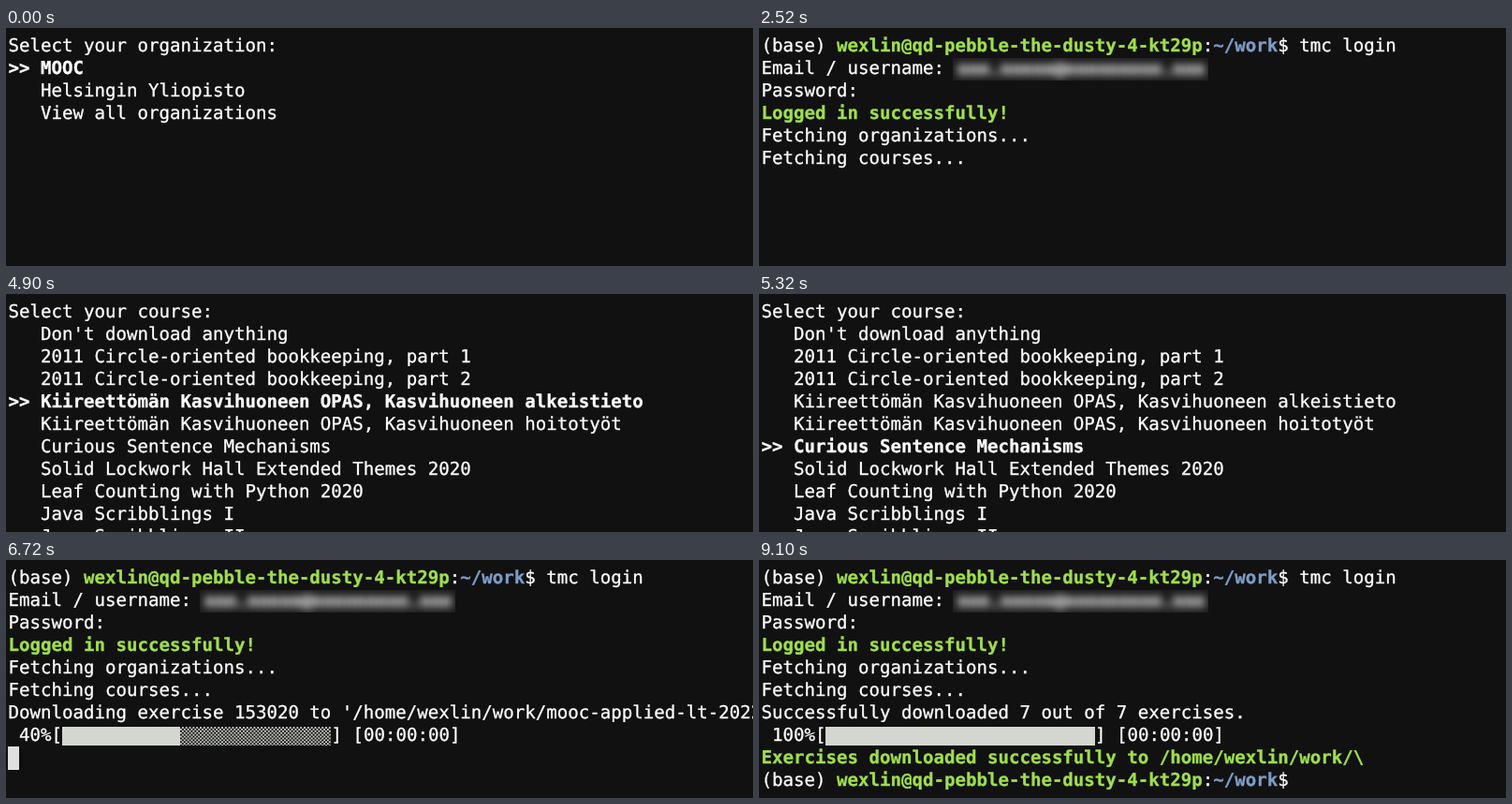
An HTML page for the animation above (9760 ms loop, 798x254 px).

```html
<!DOCTYPE html>
<html lang="en">
<head>
<meta charset="utf-8">
<title>Terminal login</title>
<style>
html, body { margin: 0; width: 100%; height: 100%; overflow: hidden; background: #111; }
body { position: relative; contain: paint; }
pre {
  position: absolute; inset: 0; box-sizing: border-box; margin: 0; padding: 6.6px 0 0 2.5px;
  overflow: hidden; color: #fff;
  font: 19.1px/24px "DejaVu Sans Mono", monospace;
  text-rendering: geometricPrecision; font-variant-ligatures: none;
  -webkit-text-stroke: .3px;
}
b.green { color: #9fdf4d; }
b.blue { color: #7d9dc8; }
.bar i { display: inline-block; height: 20px; vertical-align: -5px; }
.full { background: #d3d7cf; }
.rest { background: repeating-conic-gradient(#c4c8c0 0 25%, #111 0 50%) 0 0 / 3.83px 3.83px; }
.secret {
  position: absolute; left: 207px; top: 32px; width: 273px; height: 24px;
  overflow: hidden; background: #1c1c1c;
}
.secret b { display: block; margin-left: 5px; filter: blur(4px); }
#cursor { position: absolute; width: 11.5px; height: 25px; background: #e0e0e0; }
#smudge { position: absolute; left: 215px; top: 58px; width: 36px; height: 4px; background: #111; }
</style>
</head>
<body>
<pre id="screen"></pre>
<div id="cursor"></div>
<div id="smudge"></div>
<script>
const LOOP = 9760, CELL = 11.5, ROW = 24, BAR = 25;
const $ = id => document.getElementById(id);
const green = s => `<b class="green">${s}</b>`;

const home = "/home/wexlin/work/";
const prompt = `(base) ${green("wexlin@qd-pebble-the-dusty-4-kt29p")}:<b class="blue">~/work</b>$`;
const login = [
  prompt + " tmc login",
  'Email / username: <span class="secret"><b>nnn.nnnnn@nnnnnnnnn.nnn</b></span>',
  "Password:",
  green("Logged in successfully!"),
  "Fetching organizations...",
  "Fetching courses..."
];
const orgs = ["MOOC", "Helsingin Yliopisto", "View all organizations"];
const courses = [
  "Don't download anything",
  "2011 Circle-oriented bookkeeping, part 1",
  "2011 Circle-oriented bookkeeping, part 2",
  "Kiireettömän Kasvihuoneen OPAS, Kasvihuoneen alkeistieto",
  "Kiireettömän Kasvihuoneen OPAS, Kasvihuoneen hoitotyöt",
  "Curious Sentence Mechanisms",
  "Solid Lockwork Hall Extended Themes 2020",
  "Leaf Counting with Python 2020",
  "Java Scribblings I",
  "Java Scribblings II"
];

const menu = (title, items, pick) => ({
  lines: [title, ...items.map((s, i) => i === pick ? `<b>&gt;&gt; ${s}</b>` : "   " + s)]
});
const pickCourse = n => menu("Select your course:", courses, n);

const shell = (extra, cursor) => ({ lines: [...login, ...extra], cursor });

function bar(percent) {
  const n = Math.min(BAR, Math.floor(percent / 100 * BAR) + 1);
  const part = (name, cols) => `<i class="${name}" style="width:${cols * CELL}px"></i>`;
  return `<span class="bar"> ${percent}%[${part("full", n)}${part("rest", BAR - n)}] [00:00:00]</span>`;
}
const download = (message, percent) => shell([message, bar(percent)], [0, 8]);
const exercise = id => `Downloading exercise ${id} to '${home}mooc-applied-lt-2022'`;
const done = on => shell([
  "Successfully downloaded 7 out of 7 exercises.",
  bar(100),
  green(`Exercises downloaded successfully to ${home}\\`),
  prompt
], on && [50, 9]);

const pickOrg = menu("Select your organization:", orgs, 0);

// [start in ms, screen]
const scenes = [
  [0, pickOrg],
  [1680, { ...pickOrg, smudge: true }],
  [1960, shell([], [0, 6])],
  [2520, shell([])],
  [3080, shell([], [0, 6])],
  [3500, pickCourse(0)],
  [4480, pickCourse(1)],
  [4620, pickCourse(2)],
  [4900, pickCourse(3)],
  [5040, pickCourse(4)],
  [5320, pickCourse(5)],
  [6160, shell([], [0, 6])],
  [6440, download("Downloading 7 exercises", 0)],
  [6580, download("Downloading 7 exercises", 20)],
  [6720, download(exercise(153020), 40)],
  [6860, download(exercise(153020), 60)],
  [7000, download(exercise(153020), 75)],
  [7140, download(exercise(153024), 90)],
  [7280, done(true)],
  [7840, done(false)],
  [8540, done(true)],
  [9100, done(false)]
];

let shown;
function show({ lines, cursor, smudge }) {
  $("screen").innerHTML = lines.join("\n");
  $("cursor").hidden = !cursor;
  $("smudge").hidden = !smudge;
  if (cursor) {
    $("cursor").style.left = 2 + cursor[0] * CELL + "px";
    $("cursor").style.top = 7 + cursor[1] * ROW + "px";
  }
}

const start = performance.now();
function tick() {
  const t = (performance.now() - start) % LOOP;
  const scene = scenes.findLast(([from]) => from <= t)[1];
  if (scene !== shown) show(shown = scene);
  requestAnimationFrame(tick);
}
tick();
</script>
</body>
</html>
```
